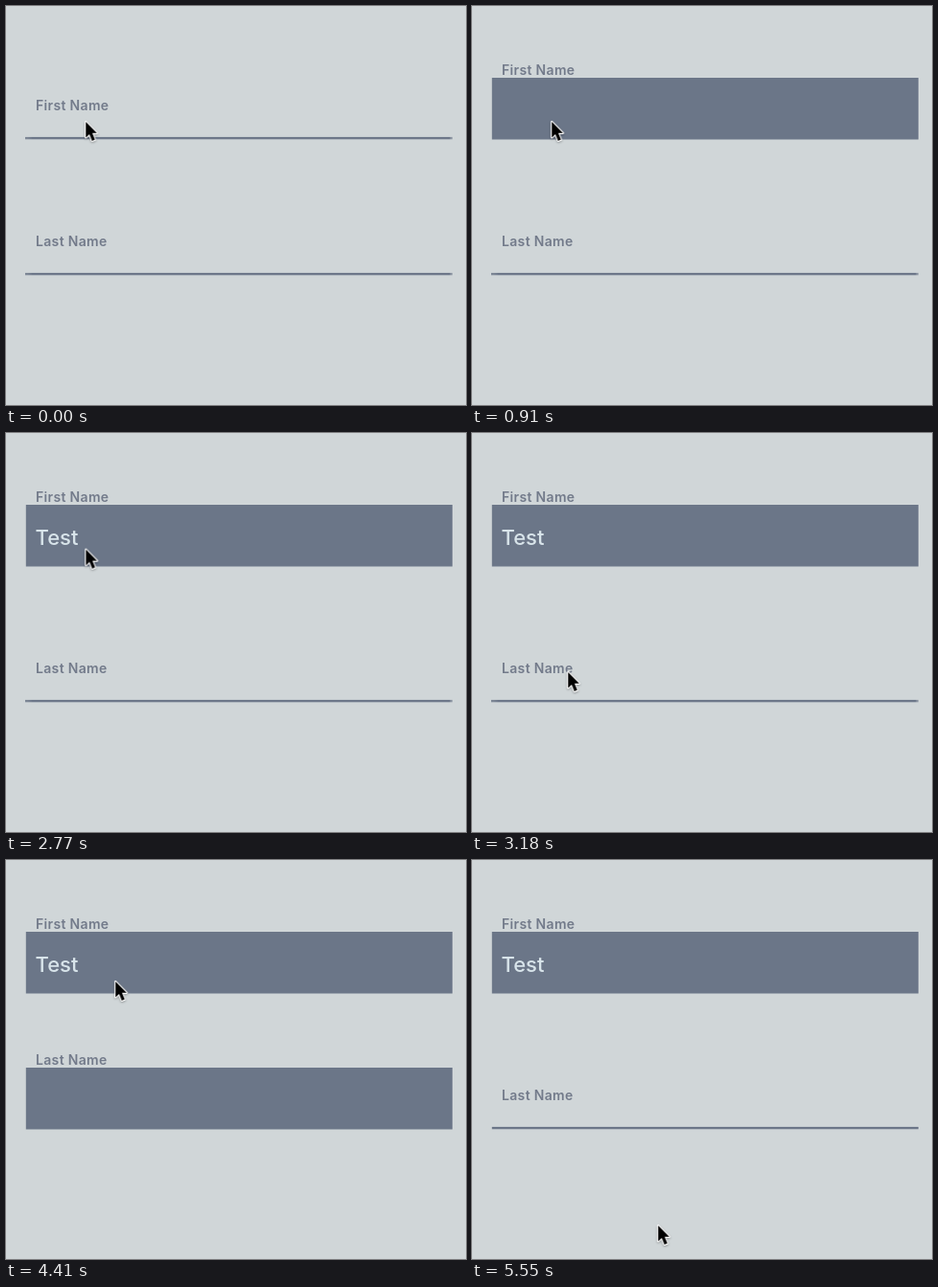
Write an HTML page that moves like this. It is 480 by 417 pixels and loops after 5.6 s.

```html
<!DOCTYPE html>
<html lang="en">
<head>
<meta charset="utf-8">
<title>Floating labels</title>
<style>
  html, body { margin: 0; width: 100%; height: 100%; overflow: hidden; background: #d0d6d8; }
  body { position: relative; font-family: Inter, "Open Sans", sans-serif; }
  .field { position: absolute; left: 0; width: 480px; height: 142px; }
  .field > * { position: absolute; }
  .bar { left: 0; top: 0; overflow: visible; fill: #6b7688; }
  .bar rect { transform-origin: 0 139.5px; transform: scaleY(.04); }
  .label { left: 31px; top: 94px; line-height: 20px; font-size: 14px; font-weight: 600;
           letter-spacing: .33px; color: #727a8a; white-space: nowrap; }
  .value { left: 30.5px; top: 94px; line-height: 30px; font-size: 22px; font-weight: 450;
           color: transparent; }
  .caret { left: 31.4px; top: 95px; width: 2px; height: 28px; background: #dbe5ea; opacity: 0; }
  #pointer { position: absolute; left: 0; top: 0; overflow: visible;
             filter: drop-shadow(0 1px 1px rgba(0, 0, 0, .3)); }
</style>
</head>
<body>
<div class="field" id="first" style="top:0">
  <svg class="bar" width="480" height="142"><rect x="20.8" y="75" width="445" height="64.5"/></svg>
  <div class="label">First Name</div>
  <div class="value"><span>T</span><span>e</span><span>s</span><span>t</span></div>
  <div class="caret"></div>
</div>
<div class="field" id="last" style="top:142.4px">
  <svg class="bar" width="480" height="142"><rect x="20.8" y="75" width="445" height="64.5"/></svg>
  <div class="label">Last Name</div>
  <div class="caret"></div>
</div>
<svg id="pointer" width="16" height="26">
  <path d="M0 0V17.5L4 13.8L7 21.2L10.2 19.8L7.2 12.6H12.4Z" transform="scale(.94)" fill="#000"
        stroke="#fff" stroke-width="2.4" stroke-linejoin="round" paint-order="stroke"/>
</svg>
<script>
const LOOP = 5600;
const BAR_TIME = 300, LABEL_DELAY = 250, LABEL_TIME = 300;
const HOLD = 'steps(1, end)';
const $ = selector => document.querySelector(selector);

// Each step is [time, value, easing towards the next step].
function play(element, property, steps) {
  const last = steps[steps.length - 1];
  const frames = [...steps, [LOOP, last[1]]].map(([time, value, easing = 'linear']) =>
    ({ offset: time / LOOP, [property]: value, easing }));
  element.animate(frames, { duration: LOOP, iterations: Infinity });
}

// Switches between two values, each change lasting `length` with an ease.
function toggle(element, property, off, on, length, times) {
  const steps = [[0, off]];
  times.forEach((time, i) => {
    const [from, to] = i % 2 ? [on, off] : [off, on];
    steps.push([time, from, 'ease'], [time + length, to]);
  });
  play(element, property, steps);
}

function animateField(id, times) {
  toggle($(id + ' rect'), 'transform', 'scaleY(.04)', 'scaleY(1)', BAR_TIME, times);
  toggle($(id + ' .label'), 'transform', 'translateY(0px)', 'translateY(-37px)', LABEL_TIME,
    times.map(time => time + LABEL_DELAY));
}

function animateCaret(id, changes) {
  play($(id + ' .caret'), 'opacity',
    [[0, 0, HOLD], ...changes.map((time, i) => [time, i % 2 ? 0 : 1, HOLD])]);
}

animateField('#first', [357]);
animateField('#last', [3537, 4680]);
animateCaret('#first', [357, 880, 1450, 2770, 3310, 3537, 4700, 5320]);
animateCaret('#last', [3537, 4060, 4590, 4680]);

const typed = [1500, 1640, 2000, 2230];
const caretX = [13, 24, 35, 44];
play($('#first .caret'), 'transform', [[0, 'translateX(0px)', HOLD],
  ...typed.map((time, i) => [time, `translateX(${caretX[i]}px)`, HOLD])]);
document.querySelectorAll('.value span').forEach((letter, i) =>
  play(letter, 'color', [[0, 'transparent', HOLD], [typed[i], '#d8e4ea', HOLD]]));

const move = 'cubic-bezier(.4, 0, .3, 1)';
play($('#pointer'), 'transform', [
  [0, 83.3, 121, move], [150, 84, 127, move], [330, 83.3, 121],
  [2750, 83.3, 121, move], [3170, 100.3, 250],
  [4040, 100.3, 250, move], [4410, 114.3, 127],
  [5290, 114.3, 127, move], [5550, 194.3, 382]
].map(([time, x, y, easing]) => [time, `translate(${x}px, ${y}px)`, easing]));
</script>
</body>
</html>
```
